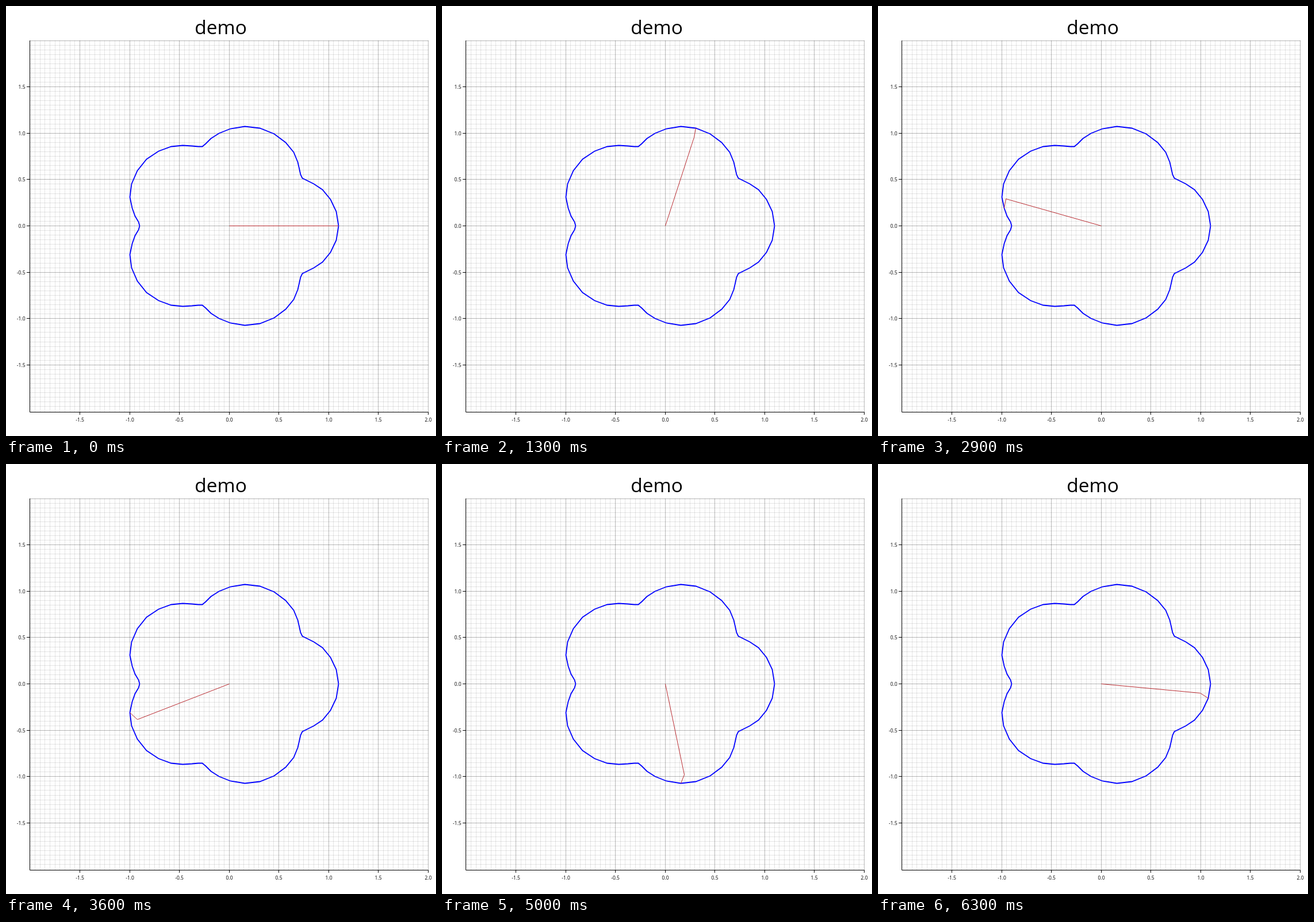
These frames come from a looping animation (748 by 748 pixels, 6.4 s). An HTML page with a canvas:

```html
<!DOCTYPE html>
<html lang="en">
<head>
<meta charset="utf-8">
<title>demo</title>
<style>
  html, body { margin: 0; width: 100%; height: 100%; overflow: hidden; background: #fff; }
  canvas { display: block; }
</style>
</head>
<body>
<canvas id="plot" width="748" height="748"></canvas>
<script>
const ctx = document.getElementById('plot').getContext('2d');
const LEFT = 42, RIGHT = 734, TOP = 60, BOTTOM = 705;
const STEPS = 64, STEP_MS = 100;

// Chart values (-2..2) to pixel centres
const px = v => Math.floor(LEFT + (v + 2) / 4 * (RIGHT - LEFT) + 1e-6) + 0.5;
const py = v => Math.floor(BOTTOM - (v + 2) / 4 * (BOTTOM - TOP) + 1e-6) + 0.5;

function line(points, color, width = 1) {
  ctx.beginPath();
  for (const [x, y] of points) ctx.lineTo(x, y);
  ctx.strokeStyle = color;
  ctx.lineWidth = width;
  ctx.stroke();
}

function text(str, x, y, size, align) {
  ctx.font = `${size}px "Open Sans", sans-serif`;
  ctx.textAlign = align;
  ctx.fillStyle = '#000';
  ctx.fillText(str, x, y);
}

// Arm tips: a unit circle carrying a smaller, six times faster one
function arms(step) {
  const a = step / STEPS * 2 * Math.PI;
  const x = Math.cos(a), y = Math.sin(a);
  return [[0, 0], [x, y], [x + 0.1 * Math.cos(6 * a), y + 0.1 * Math.sin(6 * a)]]
    .map(([u, v]) => [px(u), py(v)]);
}

const curve = Array.from({ length: STEPS + 1 }, (_, i) => arms(i)[2]);

function gridLines(v, color) {
  line([[px(v), TOP], [px(v), BOTTOM + 1]], color);
  line([[LEFT, py(v)], [RIGHT + 1, py(v)]], color);
}

function drawChart() {
  for (let i = -39; i <= 40; i++) gridLines(i / 20, 'rgba(0,0,0,.1)');
  for (let v = -1.5; v <= 2; v += 0.5) {
    gridLines(v, 'rgba(0,0,0,.2)');
    const label = v.toFixed(1);
    line([[px(v), 706], [px(v), 711]], '#000');
    text(label, px(v), 722.5, 8.5, 'center');
    if (v < 2) {
      line([[36, py(v)], [41, py(v)]], '#000');
      text(label, 33.5, py(v) + 3.3, 8.5, 'right');
    }
  }
  line([[41.5, TOP], [41.5, 706.5], [RIGHT + 1, 706.5]], '#000');
  text('demo', 373.5, 48.5, 33.5, 'center');
}

function draw(now) {
  const step = Math.floor(now / STEP_MS) % STEPS;
  ctx.clearRect(0, 0, 748, 748);
  drawChart();
  line(curve, '#00f', 1.8);
  line(arms(step), '#b82a30');
  requestAnimationFrame(draw);
}
requestAnimationFrame(draw);
</script>
</body>
</html>
```
